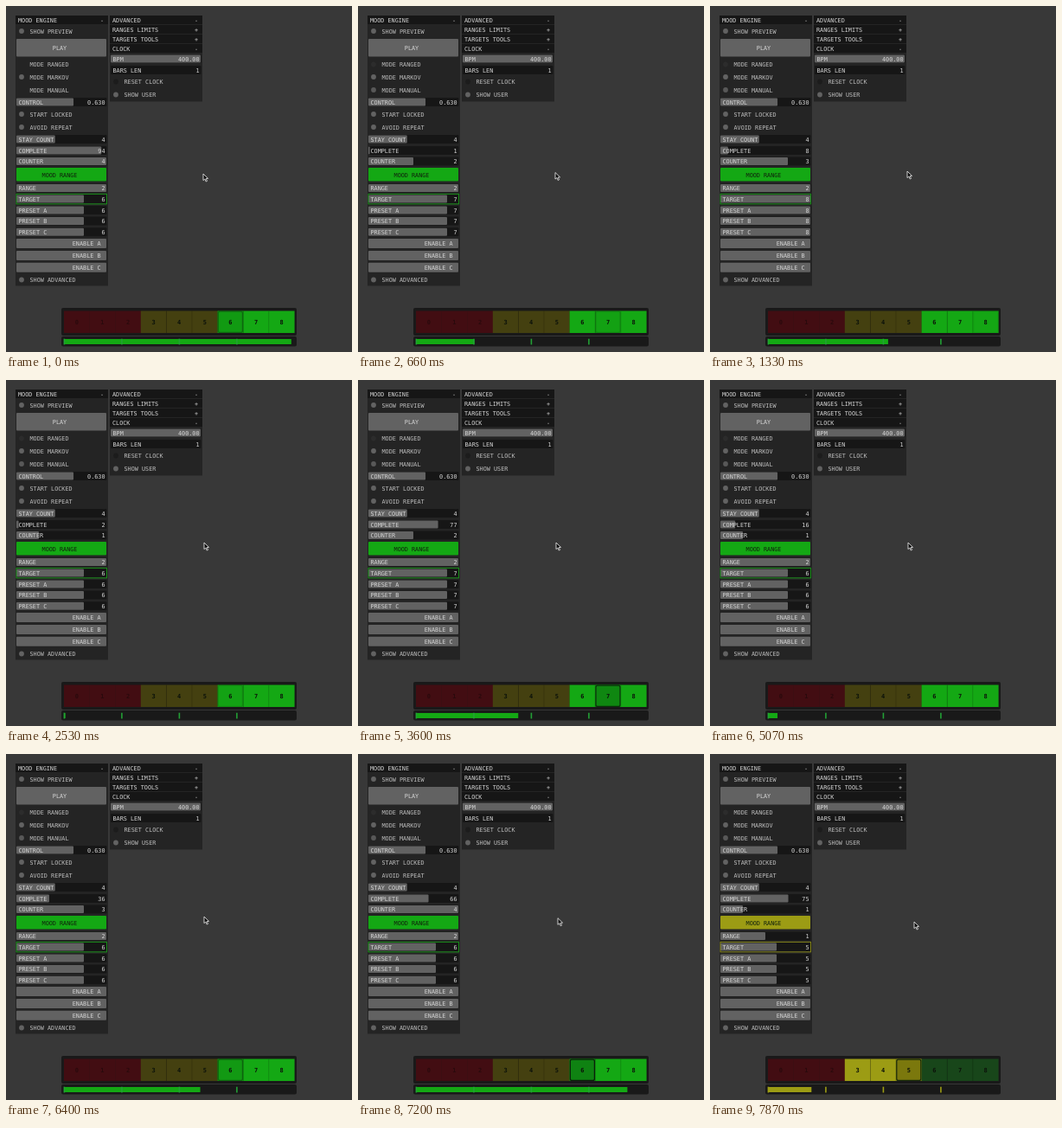
These frames come from a looping animation (400x400 px, 8 s). An HTML page with a canvas:

```html
<!DOCTYPE html>
<html lang="en">
<head>
<meta charset="utf-8">
<title>Mood engine</title>
<style>
html, body { margin: 0; width: 100%; height: 100%; overflow: hidden; background: #383838; }
canvas { display: block; width: 400px; height: 400px; }
</style>
</head>
<body>
<canvas id="stage" width="400" height="400"></canvas>
<script>
const g = document.getElementById('stage').getContext('2d');

const LOOP = 8000, STEPS = 60;
const FONT = '"DejaVu Sans Mono", monospace';
const LIGHT = '#d6d6d6', PANEL = '#242424', DARK = '#161616', GREY = '#626262';
const MOODS = [
  { dim: '#420d12', on: '#a01818', low: '#701010' },
  { dim: '#444010', on: '#9c9c14', low: '#77730c' },
  { dim: '#18461a', on: '#14a814', low: '#0f8212' }
];

// Bars elapsed and pointer position, keyed by step
const CLOCK = [[0, 3.945], [10, 6.085], [19, 8.025], [27, 9.775], [38, 12.165], [48, 14.365], [59, 16.755]];
const POINTER = [[0, 228, 194], [10, 228, 191], [19, 229, 188], [52, 229, 188], [59, 236, 194]];
// Target level for each bar, from the fourth on
const FIRST_BAR = 3, TARGETS = '66788677766665';

function at(keys, step, col = 1) {
  let i = 1;
  while (i < keys.length - 1 && keys[i][0] < step) i++;
  const a = keys[i - 1], b = keys[i];
  return a[col] + (b[col] - a[col]) * (step - a[0]) / (b[0] - a[0]);
}

function box(x, y, w, h, color, r = 0) {
  g.fillStyle = color;
  g.beginPath();
  g.roundRect(x, y, w, h, r);
  g.fill();
}

function text(s, x, y, align = 'left', color = LIGHT, size = 6.8, weight = 'normal') {
  g.font = `${weight} ${size}px ${FONT}`;
  g.textAlign = align;
  g.textBaseline = 'alphabetic';
  g.fillStyle = color;
  g.fillText(s, x, y + 2.5);
}

function header(x, y, label, sign) {
  box(x, y, 107, 10, DARK);
  text(label, x + 3, y + 5);
  text(sign, x + 102, y + 5, 'right');
}

function toggle(x, y, label, color = GREY) {
  if (color) {
    g.fillStyle = color;
    g.beginPath();
    g.arc(x + 7, y, 2.9, 0, 7);
    g.fill();
  }
  text(label, x + 16.5, y, 'left', '#bebebe');
}

function slider(x, y, label, value, part) {
  box(x + 1, y - 5, 104.5, 10, DARK, 1);
  box(x + 1, y - 4.5, 104 * part, 9, GREY, 1);
  text(label, x + 3.5, y);
  text(value, x + 103.5, y, 'right');
}

function button(y, h, color) {
  box(12, y, 104, h, color, 1);
}

function mainPanel(step, s) {
  box(11, 11, 107, 312.5, PANEL);
  header(11, 11, 'MOOD ENGINE', '-');
  toggle(11, 29, 'SHOW PREVIEW');
  button(38, 20.5, GREY);
  text('PLAY', 62, 48, 'center');
  const settled = step >= 3;
  toggle(11, 67.5, 'MODE RANGED', settled && '#2c2c2c');
  toggle(11, 82, 'MODE MARKOV');
  toggle(11, 97, 'MODE MANUAL', settled && '#585858');
  slider(11, 111, 'CONTROL', '0.630', .635);
  toggle(11, 125, 'START LOCKED');
  toggle(11, 140, 'AVOID REPEAT');
  slider(11, 154, 'STAY COUNT', 4, .43);
  slider(11, 167, 'COMPLETE', Math.floor(s.phase * 100), s.phase);
  slider(11, 179.5, 'COUNTER', s.counter, s.counter / 4);

  const color = MOODS[s.mood].on;
  button(187, 15.5, color);
  text('MOOD RANGE', 62, 195, 'center', '#10200c');
  slider(11, 210.5, 'RANGE', s.mood, s.mood / 2);
  slider(11, 223, 'TARGET', s.target, s.target / 8);
  g.strokeStyle = color;
  g.lineWidth = .8;
  g.strokeRect(12, 217.3, 104.5, 11.6);
  ['A', 'B', 'C'].forEach((name, i) => {
    slider(11, 236 + 12.6 * i, 'PRESET ' + name, s.target, s.target / 8);
    button(269 + 13.9 * i, 11, GREY);
    text('ENABLE ' + name, 109.5, 274.5 + 13.9 * i, 'right');
  });
  toggle(11, 316.5, 'SHOW ADVANCED');
}

function advancedPanel() {
  box(120, 11, 107, 99.5, PANEL);
  header(120, 11, 'ADVANCED', '-');
  header(120, 22, 'RANGES LIMITS', '+');
  header(120, 33, 'TARGETS TOOLS', '+');
  header(120, 44, 'CLOCK', '-');
  slider(120, 61, 'BPM', '400.00', 1);
  slider(120, 74, 'BARS LEN', 1, 0);
  toggle(120, 87.5, 'RESET CLOCK', '#1c1c1c');
  toggle(120, 102.5, 'SHOW USER');
}

function board(s) {
  box(64, 349, 272, 32, '#191919', 2);
  const w = 29.6;
  const pulse = (1 - Math.cos(2 * Math.PI * (s.phase - .15))) / 2;
  for (let i = 0; i < 9; i++) {
    const x = 67 + w * i, mood = Math.floor(i / 3), c = MOODS[mood];
    const lit = mood === s.mood;
    box(x, 352.5, w + .2, 25.5, lit ? c.on : c.dim);
    if (i % 3 && mood) box(x - .4, 352.5, .8, 25.5, 'rgba(0,0,0,.22)');
    if (i === s.target) {
      g.globalAlpha = pulse;
      box(x, 352.5, w, 25.5, c.low, 2);
      g.strokeStyle = '#0b1f0a';
      g.lineWidth = 1.2;
      g.beginPath();
      g.roundRect(x + .8, 353.2, w - 1.6, 24.2, 2);
      g.stroke();
      g.globalAlpha = 1;
    }
    text(i, x + w / 2, 365.5, 'center', mood ? '#0c120a' : '#2a0a0d', 7, 'bold');
  }

  const color = MOODS[s.mood].on;
  box(64, 382, 272, 11.5, '#191919', 2);
  box(67, 385, 266.5 * (s.counter - 1 + s.phase) / 4, 6, color);
  for (let i = 0; i < 4; i++) box(66.6 + 66.5 * i, 384.7, 1.6, 6.8, s.mood === 2 ? '#23a035' : color);
}

function pointer(x, y) {
  g.save();
  g.translate(x, y);
  g.beginPath();
  [[0, 0], [0, 7.6], [1.9, 6], [3.2, 9], [4.5, 8.4], [3.2, 5.5], [5.6, 5.4]]
    .forEach(p => g.lineTo(...p));
  g.closePath();
  g.fillStyle = '#111';
  g.fill();
  g.strokeStyle = '#dedede';
  g.lineWidth = .9;
  g.stroke();
  g.restore();
}

function draw(time) {
  // Frame delays are cut to hundredths of a second
  const step = Math.floor((time + 7) % LOOP * STEPS / LOOP);
  const bars = at(CLOCK, step), bar = Math.floor(bars);
  const target = +TARGETS[bar - FIRST_BAR];
  const state = { phase: bars - bar, counter: bar % 4 + 1, target, mood: Math.floor(target / 3) };
  box(0, 0, 400, 400, '#383838');
  mainPanel(step, state);
  advancedPanel();
  board(state);
  pointer(at(POINTER, step, 1), at(POINTER, step, 2));
}

const start = performance.now();
function tick() {
  draw(performance.now() - start);
  requestAnimationFrame(tick);
}
tick();
</script>
</body>
</html>
```
